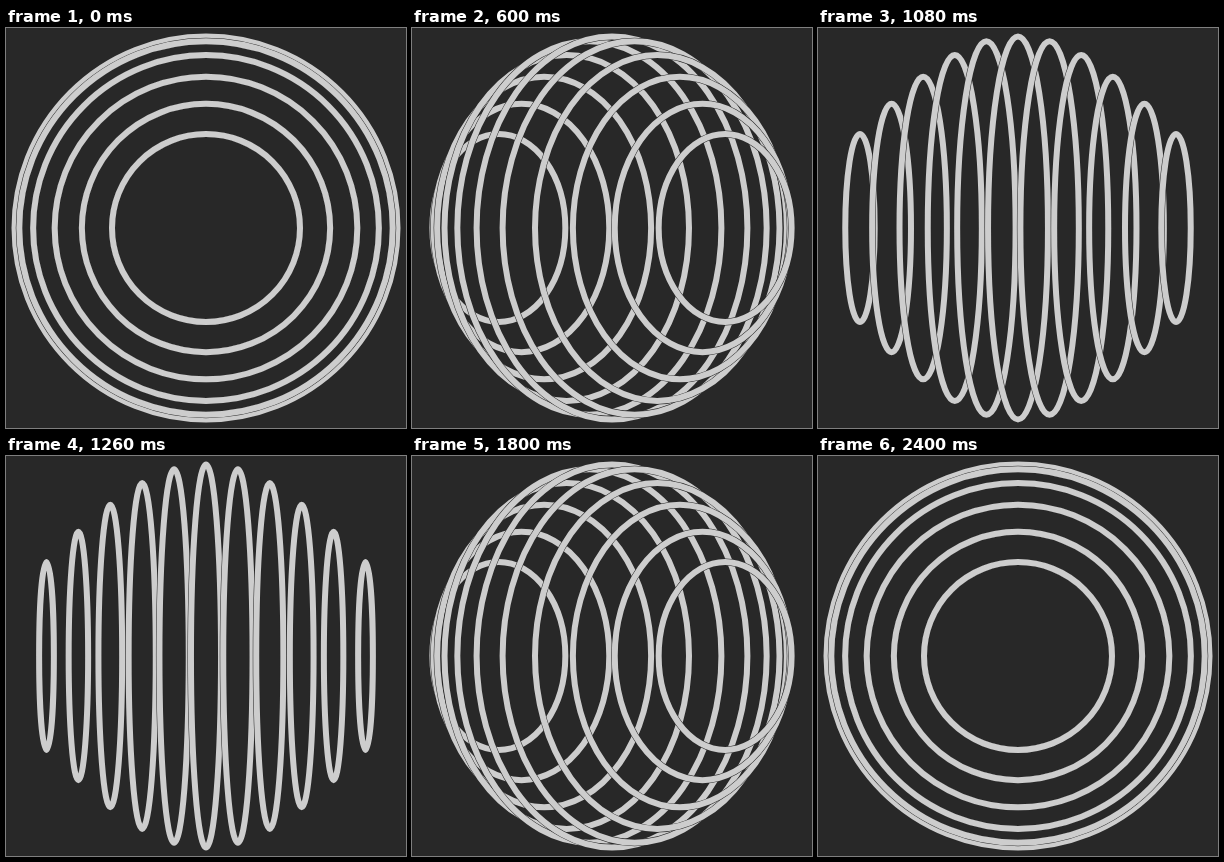
Animation of 400 by 400 pixels, one loop 2.43 s. Source, as an HTML page with a canvas:

```html
<!DOCTYPE html>
<html lang="en">
<head>
<meta charset="utf-8">
<title>Turning rings</title>
<style>
  html, body { margin: 0; width: 100%; height: 100%; overflow: hidden; background: #282828; }
  canvas { display: block; width: 400px; height: 400px; }
</style>
</head>
<body>
<canvas id="stage" width="400" height="400"></canvas>
<script>
  const ctx = document.getElementById('stage').getContext('2d');
  const BACK = '#282828', LIGHT = '#cdcdcd';
  const STEP = 30, STEPS = 81, HALF_TURN = 80;
  const SIDE = 5, SPACING = 32;

  function strokeRing(color, width) {
    ctx.strokeStyle = color;
    ctx.lineWidth = width;
    ctx.stroke();
  }

  // A ring of the stack, seen from the front while the stack turns about its vertical axis.
  function drawRing(index, angle) {
    const radius = 94 + 97.5 * Math.cos(index * Math.PI / (2 * SIDE));
    const x = 200 + index * SPACING * Math.sin(angle);
    ctx.beginPath();
    ctx.ellipse(x, 200, Math.max(0.01, radius * Math.abs(Math.cos(angle))), radius, 0, 0, 2 * Math.PI);
    ctx.closePath();
    strokeRing(BACK, 7);
    strokeRing(LIGHT, 6);
  }

  function draw(time) {
    const step = Math.floor(time / STEP + 1e-6) % STEPS;
    const angle = Math.PI * step / HALF_TURN;
    ctx.fillStyle = BACK;
    ctx.fillRect(0, 0, 400, 400);
    ctx.lineJoin = 'round';
    for (let i = -SIDE; i <= SIDE; i++) drawRing(i, angle);
  }

  let start = null;
  function tick(now) {
    if (start === null) start = now;
    draw(now - start);
    requestAnimationFrame(tick);
  }

  draw(0);
  requestAnimationFrame(tick);
</script>
</body>
</html>
```
